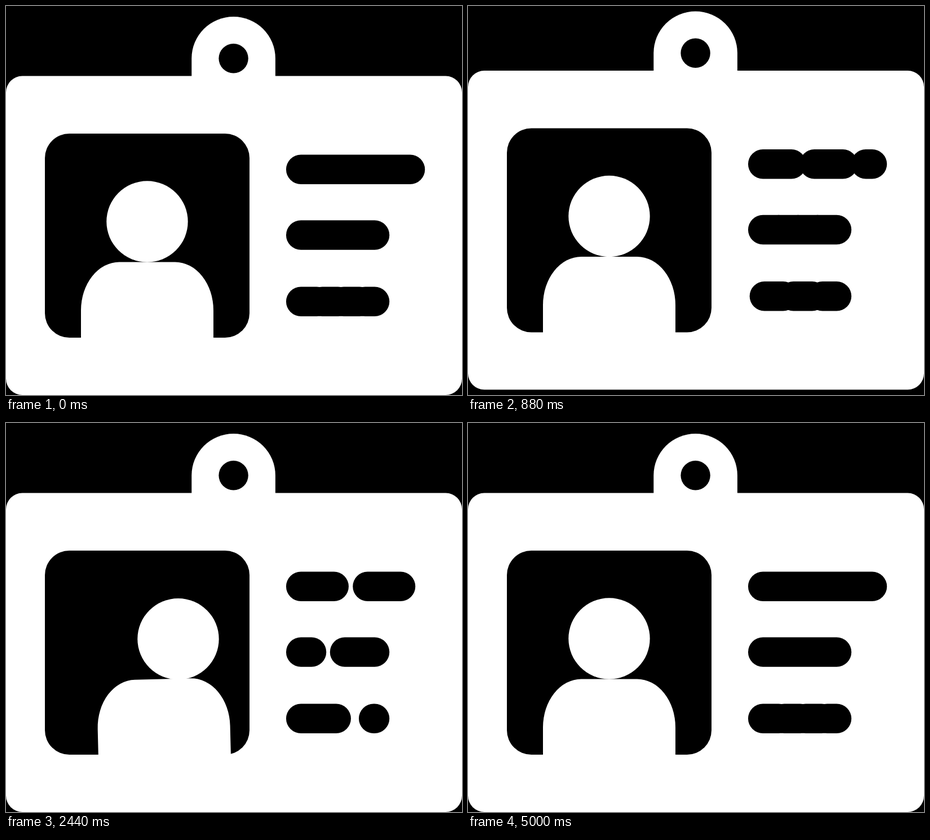
An HTML page with a canvas that plays this animation: 809x692 px, repeating every 5.76 s.

```html
<!DOCTYPE html>
<html lang="en">
<head>
<meta charset="utf-8">
<title>ID badge</title>
<style>
  html, body { margin: 0; width: 100%; height: 100%; overflow: hidden; background: #000; }
  canvas { display: block; }
</style>
</head>
<body>
<canvas id="stage" width="809" height="692"></canvas>
<script>
const ctx = document.getElementById('stage').getContext('2d');
const LOOP = 5760, STEP = 40;
const WHITE = '#fff', BLACK = '#000';

const lerp = (a, b, p) => a + (b - a) * p;

// Eased progress between two times
function ease(t, start, end) {
  const u = Math.min(1, Math.max(0, (t - start) / (end - start)));
  return u < 0.5 ? 4 * u ** 3 : 1 - 4 * (1 - u) ** 3;
}

// Goes from 0 to 1, holds, and returns to 0
const hold = (t, inStart, inEnd, outStart, outEnd) =>
  ease(t, inStart, inEnd) - ease(t, outStart, outEnd);

function circle(x, y, r, color) {
  ctx.fillStyle = color;
  ctx.beginPath();
  ctx.arc(x, y, r, 0, Math.PI * 2);
  ctx.fill();
}

function roundRect(x, y, w, h, r, color) {
  ctx.fillStyle = color;
  ctx.beginPath();
  ctx.roundRect(x, y, w, h, r);
  ctx.fill();
}

function textBar(from, to, y, dash, gap) {
  ctx.strokeStyle = BLACK;
  ctx.lineWidth = 52.5;
  ctx.lineCap = 'round';
  ctx.setLineDash(gap > 0.1 ? [dash, gap] : []);
  ctx.beginPath();
  ctx.moveTo(from, y);
  ctx.lineTo(to, y);
  ctx.stroke();
}

function drawCard() {
  ctx.fillStyle = WHITE;
  ctx.beginPath();
  ctx.arc(403.6, 93.3, 74.3, Math.PI, 0);
  ctx.lineTo(477.9, 140);
  ctx.lineTo(329.3, 140);
  ctx.fill();
  roundRect(0, 124.5, 809, 567.5, 29, WHITE);
  circle(403.6, 93.3, 26.2, BLACK);
  roundRect(69, 227, 363, 363, 43.5, BLACK);
}

function drawBody(t) {
  const p = hold(t, 1920, 2390, 4200, 4680);
  ctx.save();
  ctx.translate(250.5 + 27.5 * p, 455.5);
  ctx.rotate(-0.025 * p);
  ctx.fillStyle = WHITE;
  ctx.beginPath();
  ctx.moveTo(-117.5, 150);
  ctx.lineTo(-117.5, 86);
  ctx.ellipse(-49.5, 86, 68, 86, 0, Math.PI, Math.PI * 1.5);
  ctx.ellipse(49.5, 86, 68, 86, 0, -Math.PI / 2, 0);
  ctx.lineTo(117.5, 150);
  ctx.fill();
  ctx.restore();
}

function drawHead(t) {
  const lean = hold(t, 1880, 2360, 3960, 4440);
  const nod = hold(t, 2440, 2960, 2960, 3440);
  const raise = hold(t, 2960, 3440, 3960, 4440);
  const x = 250.5 + 55 * lean + 23 * nod - 1.5 * raise;
  const y = 383.5 + 0.7 * lean + 32 * nod - 6.3 * raise;
  circle(x, y, 72.2, WHITE);
}

function drawBars(t) {
  const first = hold(t, 606, 1086, 4200, 4640);
  const second = hold(t, 800, 1280, 4300, 4780);
  const third = hold(t, 720, 1200, 4520, 5000);
  const drift = first * (1 - Math.cos((t - 1800) / 1800 * Math.PI * 2)) / 2;
  const inset = 6 * Math.sin(Math.PI * third);
  textBar(523.2, 717, 290.7, lerp(33, 57.7, first) + drift, lerp(0, 61, first) - 1.5 * drift);
  textBar(654, 523.2, 407.5, lerp(33, 53, second), lerp(0, 59, second));
  textBar(523.2 + inset, 654, 525.7, lerp(28, 62.5, third), lerp(10, 66.5, third));
  ctx.setLineDash([]);
}

function draw(t) {
  ctx.fillStyle = BLACK;
  ctx.fillRect(0, 0, 809, 692);
  ctx.save();
  ctx.translate(0, -19 * hold(t, 170, 645, 645, 1115));
  drawCard();
  drawBody(t);
  drawHead(t);
  drawBars(t);
  ctx.restore();
}

const begin = performance.now();
function tick() {
  const t = (performance.now() - begin) % LOOP;
  draw(Math.floor(t / STEP) * STEP);
  requestAnimationFrame(tick);
}
tick();
</script>
</body>
</html>
```
